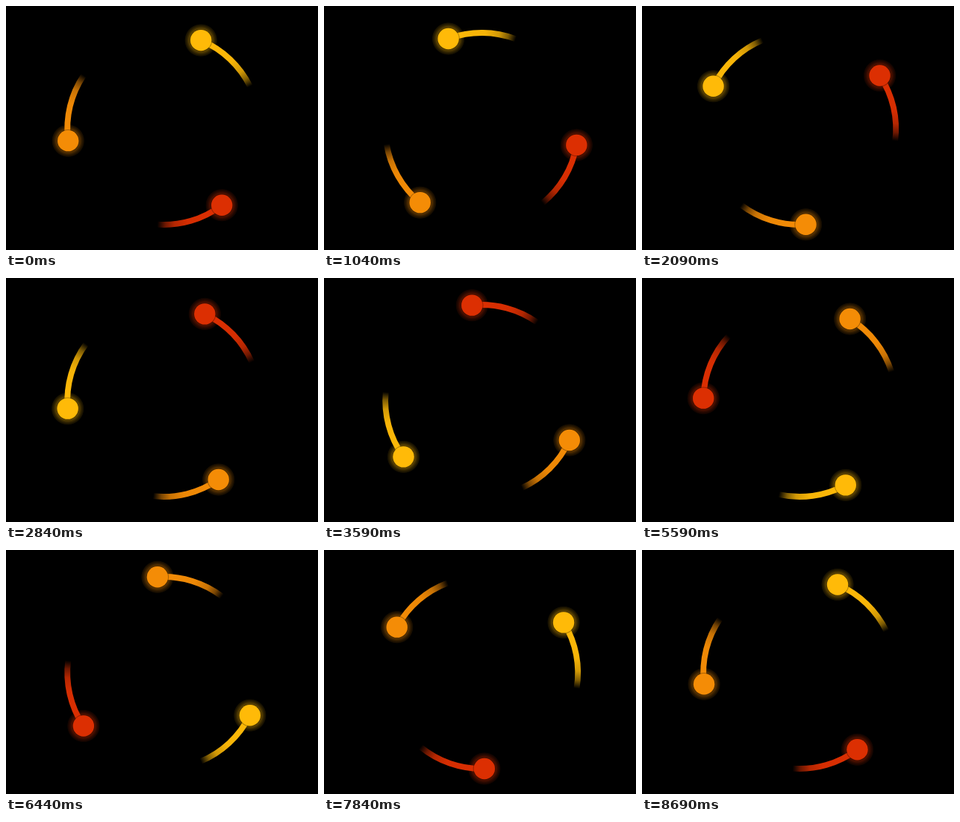
An HTML page with a canvas that plays this animation: 418 px wide and 328 px high, repeating every 8.74 s.

```html
<!DOCTYPE html>
<html lang="en">
<head>
<meta charset="utf-8">
<title>Orbiting dots</title>
<style>
  html, body { margin: 0; width: 100%; height: 100%; overflow: hidden; background: #000; }
  canvas { display: block; }
</style>
</head>
<body>
<canvas id="stage" width="418" height="328"></canvas>
<script>
const ctx = document.getElementById('stage').getContext('2d');
const LOOP = 8740, TURN = 8700;
const CX = 211.2, CY = 165, ORBIT = 129;
const START = 67.2, TRAIL = 41;
const BALL = 14.2, GLOW = 22;
const COLORS = ['255,186,8', '244,140,6', '220,47,2'];

// [share of the trail from the head, opacity]
const TRAIL_STOPS = [[0, 1], [0.55, 0.97], [0.75, 0.82], [0.88, 0.5], [1, 0]];
// [distance from the ball's centre, opacity]
const GLOW_STOPS = [[14, 0.48], [17, 0.27], [19.5, 0.14], [21.2, 0.08], [GLOW, 0]];

const rad = deg => deg * Math.PI / 180;

function disc(x, y, r, fill) {
  ctx.fillStyle = fill;
  ctx.beginPath();
  ctx.arc(x, y, r, 0, 2 * Math.PI);
  ctx.fill();
}

function drawTrail(head, rgb) {
  const fade = ctx.createConicGradient(head, CX, CY);
  for (const [s, a] of TRAIL_STOPS) fade.addColorStop(s * TRAIL / 360, `rgba(${rgb},${a})`);
  ctx.strokeStyle = fade;
  ctx.lineWidth = 7.8;
  ctx.beginPath();
  ctx.arc(CX, CY, ORBIT, head + 0.01, head + rad(TRAIL));
  ctx.stroke();
}

function drawBall(head, rgb) {
  const x = CX + ORBIT * Math.cos(head);
  const y = CY + ORBIT * Math.sin(head);
  const glow = ctx.createRadialGradient(x, y, 0, x, y, GLOW);
  for (const [r, a] of GLOW_STOPS) glow.addColorStop(r / GLOW, `rgba(${rgb},${a})`);
  disc(x, y, GLOW, glow);
  disc(x, y, BALL + 1, 'rgba(0,0,0,0.3)');
  disc(x, y, BALL, `rgb(${rgb})`);
}

// The motion advances in 50 ms steps, with a longer hold at the start.
function stepTime(t) {
  if (t < 100) return 0;
  const shift = t < 940 ? 0 : 40;
  return Math.floor((t - shift) / 50) * 50 + shift;
}

function draw(now) {
  const t = stepTime(now % LOOP);
  ctx.fillStyle = '#000';
  ctx.fillRect(0, 0, 418, 328);
  COLORS.forEach((rgb, i) => {
    const head = -rad((START + 120 * i + 360 * t / TURN) % 360);
    drawTrail(head, rgb);
    drawBall(head, rgb);
  });
}

const begin = performance.now();
function tick() {
  draw(performance.now() - begin);
  requestAnimationFrame(tick);
}
tick();
</script>
</body>
</html>
```
